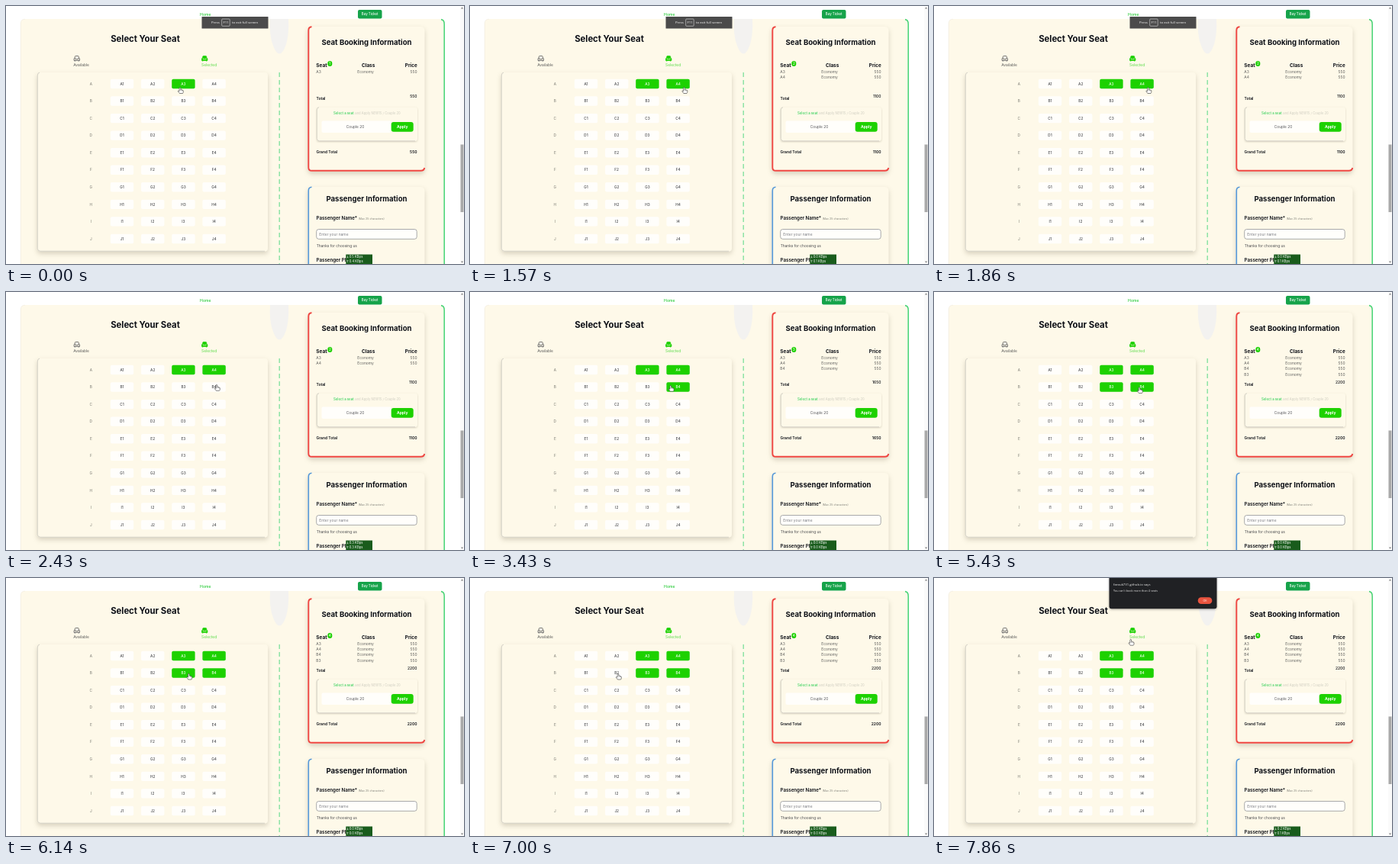
Recreate the animation shown at these times as an HTML page. Size 600 by 338 pixels, loop 8000 ms.

```html
<!DOCTYPE html>
<html lang="en">
<head>
<meta charset="utf-8">
<title>Seat booking</title>
<style>
html, body { margin: 0; width: 100%; height: 100%; overflow: hidden; background: #fff; }
svg { display: block; width: 100vw; height: 100vh; font-family: Inter, sans-serif; }
.ui { font-family: "Open Sans", sans-serif; }
.card { filter: drop-shadow(0 3px 3px rgba(60, 50, 20, .2)); }
</style>
</head>
<body>
<svg id="stage" viewBox="0 0 600 338"></svg>
<script>
const NS = 'http://www.w3.org/2000/svg';
const stage = document.getElementById('stage');
const GREEN = '#1dd100', CREAM = '#fef9e9', INK = '#0d1017', GREY = '#5d5e5c';
const LOOP = 8000, STEP = 1000 / 7;

function el(tag, attrs, parent = stage) {
  const node = document.createElementNS(NS, tag);
  for (const key in attrs) node.setAttribute(key, attrs[key]);
  return parent.appendChild(node);
}
const group = (attrs = {}) => el('g', attrs);
const rect = (x, y, width, height, fill, rx = 0, more = {}, parent) =>
  el('rect', { x, y, width, height, fill, rx, ...more }, parent);
const path = (d, attrs, parent) => el('path', { d, fill: 'none', ...attrs }, parent);

// cy is the middle of the capital letters
function text(str, x, cy, size, fill = INK, weight = 400, anchor = 'start', parent) {
  const node = el('text', {
    x, y: cy + size * 0.36, 'font-size': size, fill,
    'font-weight': weight, 'text-anchor': anchor
  }, parent);
  node.textContent = str;
  return node;
}
const show = (node, on) => node.setAttribute('visibility', on ? 'visible' : 'hidden');

function drawPage() {
  path('M19 338V23Q19 17 25 17H569Q575 17 575 23V338Z', { fill: CREAM });
  path('M19.2 338V23Q19.2 17.2 25 17.2', { stroke: '#eeeade', 'stroke-width': .6 });
  path('M570 17.6Q574.2 18 574.2 24V338', { stroke: '#4fd67c', 'stroke-width': 1.6 });
  path('M346 17Q344.500 38 350 52Q354 62.500 358 62.500Q363 62.500 367 50Q371 37 370 17Z', { fill: '#f3f2f0' });

  text('Home', 261.300, 10.800, 5.100, '#22c932', 500, 'middle');
  rect(461, 5, 31.500, 11.500, '#16a34a', 2);
  text('Buy Ticket', 476.700, 10.800, 4.300, '#fff', 500, 'middle');

  rect(595, 0, 5, 338, '#fafafa');
  rect(595.500, 181.500, 4, 88.500, '#a9a9a9');
  path('M596 3.500L597.500 1.500L599 3.500Z', { fill: '#777' });
  path('M596 334.500L597.500 336.500L599 334.500Z', { fill: '#777' });
}

function chair(x, y, color, filled) {
  const g = group({ transform: `translate(${x} ${y})` });
  path('M1.500 3.300V1.500Q1.500 .5 2.500 .5H5.500Q6.500 .5 6.500 1.500V3.300Q7.700 3 7.700 4.200V6.400H.3V4.200Q.3 3 1.500 3.300Z', {
    stroke: color, 'stroke-width': .8, fill: filled ? color : 'none'
  }, g);
  path('M2 3.300V4.700H6V3.300M1.500 6.400V7.600M6.500 6.400V7.600', {
    stroke: color, 'stroke-width': .8
  }, g);
  if (filled) path('M2 3.500V4.700H6V3.500', { stroke: CREAM, 'stroke-width': .6 }, g);
}

function drawSeats() {
  text('Select Your Seat', 182.500, 43.300, 11.300, INK, 700, 'middle');
  chair(88.800, 65, '#55565a', false);
  text('Available', 88.300, 77, 4.900, GREY);
  chair(256.200, 65, GREEN, true);
  text('Selected', 256, 77, 4.900, '#5bdc48');

  rect(41, 87, 302, 234.500, CREAM, 4, { class: 'card' });
  path('M44 87.200Q41.300 87.600 41.300 91V317.500Q41.300 321.200 45 321.200H339', {
    stroke: '#cfccc2', 'stroke-width': .9
  });
  path('M358.200 87V338', {
    stroke: '#84e2a0', 'stroke-width': 1.400, 'stroke-dasharray': '6 4'
  });

  const seats = {};
  [...'ABCDEFGHIJ'].forEach((row, r) => {
    const cy = 102 + r * 22.550;
    text(row, 111.300, cy, 4.700, '#77776f', 400, 'middle');
    for (let c = 0; c < 4; c++) {
      const cx = 152 + c * 40.200, name = row + (c + 1);
      const box = rect(cx - 15.200, cy - 6.200, 30.400, 12.400, '#fffefb', 2);
      const label = text(name, cx, cy, 4.700, '#45464a', 500, 'middle');
      seats[name] = { box, label };
    }
  });
  return seats;
}

function drawBooking() {
  rect(395.500, 27, 153, 190, CREAM, 5, { class: 'card' });
  path('M400.500 27.200Q396.300 27.500 396.300 32V211.500Q396.300 215.800 400.500 215.800H543.500Q547.500 215.800 548.300 212', {
    stroke: '#ee4540', 'stroke-width': 1.900
  });
  text('Seat Booking Information', 472.500, 47.500, 9.550, INK, 700, 'middle');
  text('Seat', 406.300, 77.500, 6.500, INK, 700);
  text('Class', 474.600, 77.500, 6.400, INK, 700, 'middle');
  text('Price', 538.700, 77.500, 6.300, INK, 700, 'end');
  rect(421.300, 71.900, 6, 7.200, GREEN, 3);
  const count = text('', 424.300, 75.500, 4.600, '#fff', 500, 'middle');

  const rows = picks.map(([name], i) => {
    const cy = 86 + i * 7.300, g = group();
    text(name, 406.300, cy, 4.900, GREY, 400, 'start', g);
    text('Economy', 471, cy, 4.900, GREY, 400, 'middle', g);
    text('550', 538.500, cy, 4.900, GREY, 400, 'end', g);
    return g;
  });

  text('Total', 406.500, 121, 5, INK, 600);
  const total = text('', 538.500, 118.400, 5, INK, 500, 'end');

  rect(407, 132.500, 132, 44.500, CREAM, 3, {
    style: 'filter:drop-shadow(0 1px 1px rgba(60,50,20,.2))'
  });
  path('M410 132.800Q407.300 133 407.300 136V173.500Q407.300 176.800 410.500 176.800H536', {
    stroke: '#cbc8be', 'stroke-width': .8
  });
  text('Select a seat', 429, 140.300, 4.350, '#35d05a', 500);
  text('and Apply NEW15 / Couple 20', 457.300, 140.300, 4.200, '#cfcdc0');
  rect(413.500, 150.500, 91, 15.500, '#fffefb', 2);
  text('Couple 20', 457.500, 158.300, 4.800, '#55565a', 400, 'middle');
  rect(504.700, 152, 29, 12.800, GREEN, 3);
  text('Apply', 519.200, 158.400, 5, '#fff', 700, 'middle');

  text('Grand Total', 406.500, 191, 4.950, INK, 600);
  const grand = text('', 538.500, 191, 5, INK, 600, 'end');
  return { count, rows, total, grand };
}

function drawPassenger() {
  rect(395.500, 237, 153, 120, CREAM, 5, { class: 'card' });
  path('M400.500 237.200Q396.300 237.500 396.300 242V338', {
    stroke: '#5296d8', 'stroke-width': 1.600
  });
  text('Passenger Information', 472.500, 253, 9.550, INK, 700, 'middle');
  text('Passenger Name*', 406.500, 278, 6.150, INK, 600);
  text('(Max 25 characters)', 461.500, 278.800, 3.600, '#85857e');
  rect(406.700, 292.500, 131.500, 12.800, '#fffefb', 3, { stroke: '#85878c', 'stroke-width': .7 });
  text('Enter your name', 410.300, 299, 4.950, '#7c7f86');
  text('Thanks for choosing us', 406.700, 314, 4.800, '#4b4c4f');
  text('Passenger Phone', 406.500, 332.300, 6.200, INK, 600);
}

function drawMeter() {
  rect(445.300, 325.500, 34.700, 12.500, '#195c1c');
  return [328.600, 334.400].map((cy, i) => {
    const tip = i ? -1.400 : 1.400;
    path(`M447.600 ${cy - 1.600}V${cy + 1.600}M446.800 ${cy + tip * .4}L447.600 ${cy + tip}L448.400 ${cy + tip * .4}`, {
      stroke: '#fff', 'stroke-width': .5
    });
    return text('', 449.700, cy, 4.200, '#fff');
  });
}

function drawToast() {
  const g = group({ class: 'ui' });
  rect(256.500, 14, 87, 15.500, '#4b4b4b', .5, {}, g);
  text('Press', 269, 21.700, 4.300, '#fff', 400, 'start', g);
  rect(282.700, 17, 10.500, 9.300, 'none', 1, { stroke: '#ddd', 'stroke-width': .6 }, g);
  text('F11', 288, 21.700, 4.300, '#fff', 400, 'middle', g);
  text('to exit full screen', 296, 21.700, 4.300, '#fff', 400, 'start', g);
  return g;
}

function drawAlert() {
  const g = group({ class: 'ui' });
  rect(229.500, -4, 141, 44.300, '#202124', 3, {
    style: 'filter:drop-shadow(0 1px 1.500px rgba(0,0,0,.3))'
  }, g);
  text('farouk731.github.io says', 235, 8.300, 4.250, '#f1f1f1', 400, 'start', g);
  text("You can't book more than 4 seats", 235, 16.500, 3.750, '#e6e6e6', 400, 'start', g);
  rect(345.700, 25.300, 18.600, 8.700, '#e9543f', 4.350, {}, g);
  text('OK', 355, 29.700, 3.600, '#fff', 400, 'middle', g);
  return g;
}

function drawHand() {
  const g = group();
  path('M-.9 .6Q-.9 -.3 0 -.3Q.8 -.3 .8 .6V2.500Q1.900 2.200 2.200 2.900Q3.200 2.600 3.400 3.400Q4.300 3.300 4.300 4.300V5.400Q4.300 6.700 3.500 7.500H-.6Q-1.400 6.300 -2.600 4.900Q-2.800 4 -1.900 4L-.9 4.700Z', {
    fill: '#fff', stroke: '#333', 'stroke-width': .6, 'stroke-linejoin': 'round'
  }, g);
  path('M.8 2.800V4.200M2.200 3.100V4.300M3.300 3.600V4.500', { stroke: '#333', 'stroke-width': .35 }, g);
  return g;
}

// seat, time of the click
const picks = [['A3', 0], ['A4', 1290], ['B4', 2710], ['B3', 4860]];
// time, down, up
const speeds = [
  [0, '0.5', '0.4'], [280, '0.2', '0.3'], [1290, '0.0', '0.1'],
  [2430, '0.3', '0.3'], [3430, '0.0', '0.0'], [7430, '0.2', '0.1']
];
// time, x, y of the fingertip
const route = [
  [0, 228, 107], [570, 228, 107], [860, 280.500, 107], [1860, 280.500, 107],
  [2290, 276, 121.800], [3150, 276, 121.800], [3570, 258.500, 123], [4290, 283, 106.800],
  [4570, 239.500, 124.700], [5000, 239.500, 124.700], [5430, 269, 125], [5710, 239.500, 125.500],
  [6140, 239.500, 125.500], [6570, 147, 125.500], [7000, 194, 125.500], [7290, 194, 125.500],
  [7860, 257.700, 80.700], [8000, 257.700, 80.700]
];

const ease = p => p * p * (3 - 2 * p);
const clamp = p => Math.min(1, Math.max(0, p));

function cursorAt(t) {
  const i = Math.max(1, route.findIndex(p => p[0] > t));
  const [t0, x0, y0] = route[i - 1], [t1, x1, y1] = route[i];
  const k = ease(clamp((t - t0) / (t1 - t0)));
  return [x0 + (x1 - x0) * k, y0 + (y1 - y0) * k];
}

drawPage();
const seats = drawSeats();
const booking = drawBooking();
drawPassenger();
const meter = drawMeter();
const toast = drawToast();
const alertBox = drawAlert();
const hand = drawHand();

function render(time) {
  const t = Math.floor((time % LOOP + 4) / STEP) * STEP + 5;

  let count = 0;
  picks.forEach(([name, at], i) => {
    const on = t >= at;
    count += on;
    seats[name].box.setAttribute('fill', on ? GREEN : '#fffefb');
    seats[name].label.setAttribute('fill', on ? '#f4fff2' : '#45464a');
    show(booking.rows[i], on);
  });
  booking.count.textContent = count;
  booking.total.textContent = booking.grand.textContent = count * 550;

  const speed = speeds.filter(s => t >= s[0]).pop();
  meter.forEach((node, i) => node.textContent = speed[i + 1] + ' KBps');

  const gone = clamp((t - 1860) / 430);
  toast.setAttribute('opacity', 1 - gone);
  toast.setAttribute('transform', `translate(0 ${-3 * gone})`);
  show(alertBox, t >= 7290);

  const [x, y] = cursorAt(t);
  hand.setAttribute('transform', `translate(${x.toFixed(2)} ${y.toFixed(2)})`);
}

function loop(now) {
  render(now);
  requestAnimationFrame(loop);
}
render(0);
requestAnimationFrame(loop);
</script>
</body>
</html>
```
